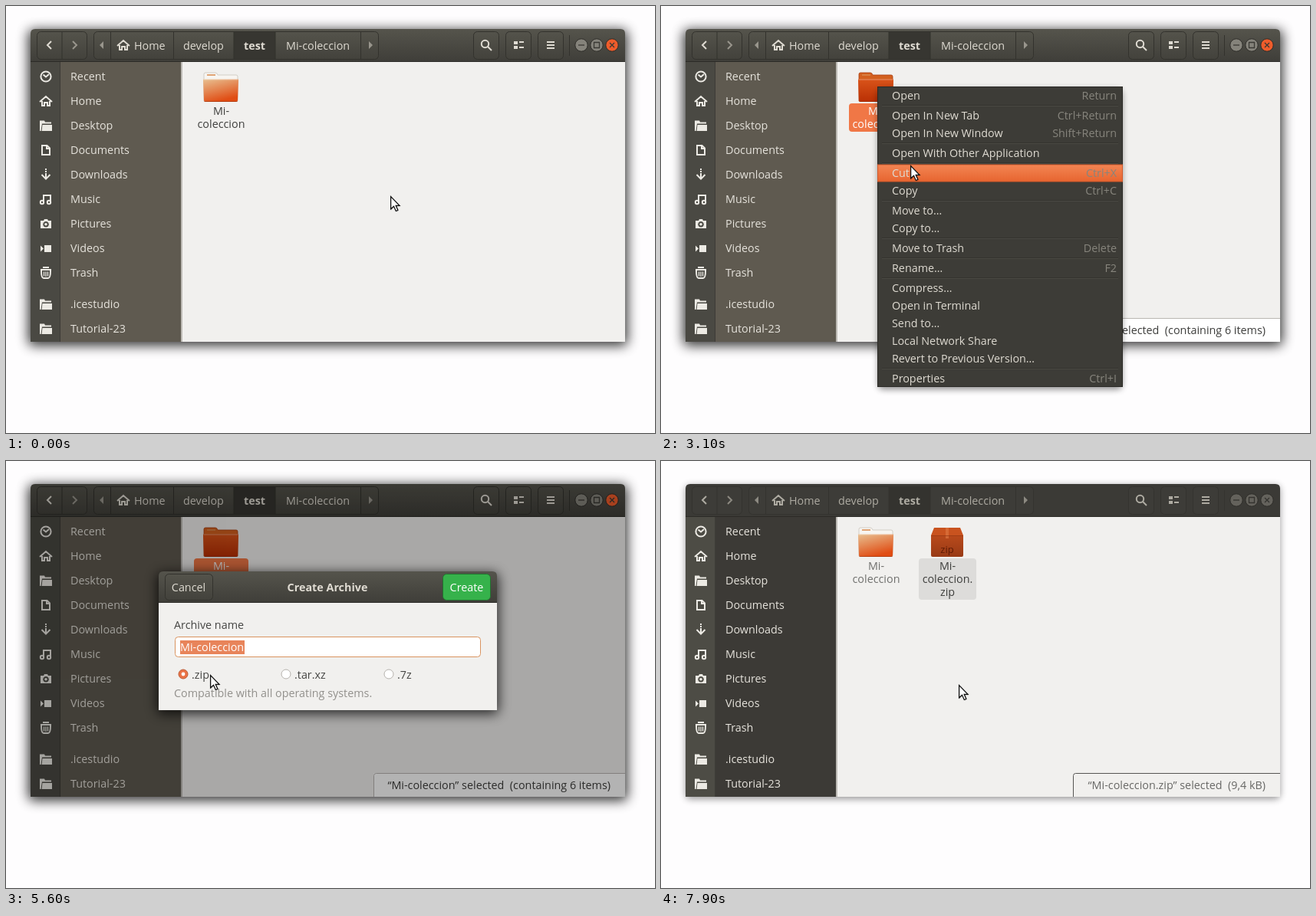
An HTML page for the animation above (8 s loop, 846 by 557 pixels).

```html
<!DOCTYPE html>
<html lang="en">
<head>
<meta charset="utf-8">
<title>Create archive</title>
<style>
html, body { margin: 0; width: 100%; height: 100%; overflow: hidden; background: #fefdfe; }
svg { display: block; width: 846px; height: 557px; }
text { font: 14.35px "Open Sans", "Noto Sans", sans-serif; white-space: pre; }
.b { font-weight: 700; }
.mid { text-anchor: middle; }
.end { text-anchor: end; }
.ln { fill: none; stroke: currentColor; stroke-width: 2; }
.ic { fill: currentColor; }

.on {
  --head: url(#headOn); --btn: url(#btnOn); --edge: #33322d; --fg: #dfdbd2; --low: #99968d;
  --down: #373631; --side: #5f5a50; --strip: #4a4943; --label: #3f3f3d;
  --knob: #85837b; --close: #ee5c2b; --glyph: #3a3934;
  --bar: #fff; --barEdge: #b9b6b2; --barText: #3d3d3b;
}
.off {
  --head: #3b3a36; --btn: #3d3c38; --edge: #34332f; --fg: #aeaba2; --low: #8d8a82;
  --down: #34332f; --side: #3c3a36; --strip: #4d4c45; --label: #70706e;
  --knob: #64625c; --close: #64625c; --glyph: #34332f;
  --bar: #f1f0ee; --barEdge: #555452; --barText: #686866;
}
.head { fill: var(--head); }
.btn { fill: var(--btn); stroke: var(--edge); }
.side text { fill: #e6e3dc; }
.side { color: #eceae4; }
.tool { color: var(--fg); }
.tool text { fill: var(--fg); }
.label { fill: var(--label); }
.bar rect { fill: var(--bar); }
.bar path { fill: none; stroke: var(--barEdge); }
.bar text { fill: var(--barText); }
.menu text { fill: #dfdbd2; }
.menu .key { fill: #87857d; }
.dlg .body text { fill: #454543; }

/* 1.25% is 100 ms */
.a { animation: 8s step-end -10ms infinite; }
.winOn { animation-name: winOn; }
.winOff { animation-name: winOff; }
.plain { animation-name: plain; }
.hover { animation-name: hover; }
.sel { animation-name: sel; }
.bar1 { animation-name: bar1; }
.bar2 { animation-name: bar2; }
.menu { animation-name: menu; }
.hl { animation-name: hl; }
.dim { animation-name: dim; }
.dlg { animation-name: dlg; transform-origin: 420px 235px; }
.go { animation-name: go; }
.dot { animation-name: dot; }
.cursor { animation-name: cursor; }

@keyframes winOn { 0% { opacity: 1 } 86.25%, 100% { opacity: 0 } }
@keyframes winOff { 0% { opacity: 0 } 86.25%, 100% { opacity: 1 } }
@keyframes plain { 0% { opacity: 1 } 17.5%, 100% { opacity: 0 } }
@keyframes hover { 0% { opacity: 0 } 17.5% { opacity: 1 } 31.25%, 100% { opacity: 0 } }
@keyframes sel { 0% { opacity: 0 } 31.25%, 100% { opacity: 1 } }
@keyframes bar1 { 0% { opacity: 1 } 93.75%, 100% { opacity: 0 } }
@keyframes bar2 { 0% { opacity: 0 } 93.75%, 100% { opacity: 1 } }
@keyframes menu { 0% { opacity: 0 } 31.25% { opacity: 1 } 55%, 100% { opacity: 0 } }
@keyframes hl {
  0% { opacity: 0; transform: translateY(117px) }
  35% { opacity: 1; transform: translateY(117px) }
  36.25% { opacity: 1; transform: translateY(143px) }
  37.5% { opacity: 1; transform: translateY(166px) }
  38.75% { opacity: 1; transform: translateY(218px) }
  40% { opacity: 1; transform: translateY(241px) }
  41.25% { opacity: 1; transform: translateY(267px) }
  42.5% { opacity: 1; transform: translateY(316px) }
  43.75% { opacity: 1; transform: translateY(342px) }
  45% { opacity: 1; transform: translateY(391px) }
  46.25% { opacity: 1; transform: translateY(414px) }
  47.5% { opacity: 1; transform: translateY(437px) }
  48.75% { opacity: 1; transform: translateY(368px) }
  50% { opacity: 1; transform: translateY(316px) }
  51.25%, 100% { opacity: 1; transform: translateY(368px) }
}
@keyframes dim {
  0% { opacity: 0 }
  56.25% { opacity: 0; animation-timing-function: steps(5) }
  62.5% { opacity: .3 }
  86.25% { opacity: .3; animation-timing-function: steps(2) }
  88.75% { opacity: .168; animation-timing-function: steps(2) }
  91.25%, 100% { opacity: 0 }
}
@keyframes dlg {
  0% { opacity: 0; transform: scaleY(.5) }
  57.5% { opacity: .75; transform: scaleY(.75) }
  58.75% { opacity: 1; transform: none }
  85% { opacity: .4; transform: scaleY(.4) }
  86.25%, 100% { opacity: 0; transform: scaleY(.4) }
}
@keyframes go { 0% { fill: #36b24b } 81.25% { fill: #45c45a } 83.75%, 100% { fill: #2b9440 } }
@keyframes dot { 0% { fill: #ea7347 } 77.5%, 100% { fill: #e2602f } }
@keyframes cursor {
  0% { transform: translate(501px, 248px) }
  6.25% { transform: translate(501px, 248px); animation-timing-function: steps(3) }
  10% { transform: translate(445px, 213px); animation-timing-function: steps(3) }
  13.75% { transform: translate(350px, 147px); animation-timing-function: steps(3) }
  17.5% { transform: translate(289px, 105px) }
  18.75% { transform: translate(289px, 105px); animation-timing-function: steps(2) }
  21.25% { transform: translate(280px, 103px) }
  33.75% { transform: translate(280px, 103px); animation-timing-function: steps(3) }
  37.5% { transform: translate(308px, 165px) }
  38.75% { transform: translate(325px, 208px); animation-timing-function: steps(5) }
  45% { transform: translate(344px, 383px); animation-timing-function: steps(2) }
  47.5% { transform: translate(346px, 440px); animation-timing-function: steps(2) }
  50% { transform: translate(345px, 312px) }
  51.25% { transform: translate(345px, 361px) }
  53.75% { transform: translate(345px, 361px); animation-timing-function: steps(7) }
  62.5% { transform: translate(330px, 284px) }
  63.75% { transform: translate(330px, 284px); animation-timing-function: steps(5) }
  70% { transform: translate(266px, 279px); animation-timing-function: steps(2) }
  72.5% { transform: translate(268px, 285px) }
  78.75% { transform: translate(268px, 285px); animation-timing-function: steps(2) }
  81.25% { transform: translate(607px, 167px) }
  92.5% { transform: translate(607px, 167px); animation-timing-function: steps(5) }
  98.75%, 100% { transform: translate(388px, 292px) }
}
</style>
</head>
<body>
<svg id="stage" viewBox="0 0 846 557"></svg>
<script>
const grad = (id, from, to, x2 = 0) =>
  `<linearGradient id="${id}" x1="0" y1="0" x2="${x2}" y2="1">
    <stop stop-color="${from}"/><stop offset="1" stop-color="${to}"/></linearGradient>`;
const rect = (x, y, w, h, attrs = '') => `<rect x="${x}" y="${y}" width="${w}" height="${h}" ${attrs}/>`;
const text = (x, y, str, cls = '', attrs = '') => `<text x="${x}" y="${y}" class="${cls}" ${attrs}>${str}</text>`;
const at = (x, y, body) => `<g transform="translate(${x} ${y})">${body}</g>`;
const line = d => `<path class="ln" d="${d}"/>`;
const solid = d => `<path class="ic" fill-rule="evenodd" d="${d}"/>`;
const shadow = (x, y, w, h, blur, alpha) =>
  rect(x, y, w, h, `rx="6" opacity="${alpha}" style="filter:blur(${blur}px)"`);
const topRound = (x, y, w, h) =>
  `M${x} ${y + h}V${y + 6}q0-6 6-6H${x + w - 6}q6 0 6 6V${y + h}Z`;

const icon = {
  home: line('M-8 1L0-6L8 1M-5 0V6H-2V2H2V6H5V0'),
  clock: `<circle class="ln" r="6.6"/>` + line('M-3.5-2.5L0 .5L4-3'),
  folder: solid('M-8 7V-6.5H-2L-1-4.5H7V-2.5H-5L-6.5 7ZM-4.5-1H8V7H-5.5Z'),
  doc: line('M-5-6H1.5L5-2.5V6H-5ZM1-6V-2H5'),
  down: line('M0-8V-6M0-5V-3M0-2V5M-5.5 0L0 5.5L5.5 0'),
  music: line('M-3 4V-5H6V3') + '<circle class="ln" cx="-5" cy="4" r="2.2"/><circle class="ln" cx="4" cy="4" r="2.2"/>',
  camera: solid('M-7-4H-3L-2-6H2L3-4H7V6H-7ZM0-3a3.8 3.8 0 1 0 .1 0Z') + '<circle class="ic" cy=".8" r="1.8"/>',
  video: solid('M-2-4H7V5H-2ZM-7-3.5L-3 .5L-7 4.5Z'),
  trash: line('M-7-4H7M-4-7H4M-6-3Q-6 7-3 7H3Q6 7 6-3') +
    '<path d="M-2.5-1.5V4.5M0-1.5V5M2.5-1.5V4.5" stroke="currentColor" stroke-width="1.3"/>',
};

const places = [['Recent', 'clock'], ['Home', 'home'], ['Desktop', 'folder'], ['Documents', 'doc'],
  ['Downloads', 'down'], ['Music', 'music'], ['Pictures', 'camera'], ['Videos', 'video'],
  ['Trash', 'trash'], ['.icestudio', 'folder'], ['Tutorial-23', 'folder']];

const sidebar = () => '<g class="side">' +
  rect(32, 73, 197, 365, 'style="fill:var(--side)"') +
  rect(32, 73, 39, 365, 'style="fill:var(--strip)"') +
  rect(70, 73, 1, 365, 'fill="#000" opacity=".18"') +
  places.map(([name, ic], i) => {
    const y = 92 + i * 32 + (i > 8 ? 9 : 0);
    return at(52, y, icon[ic]) + text(84, y + 5, name);
  }).join('') + '</g>' + rect(228, 73, 2, 365, 'fill="#bdbab5"');

const knob = (x, color, glyph) =>
  `<circle cx="${x}" cy="51" r="8.2" style="fill:var(${color});stroke:#2e2d29"/>` +
  at(x, 51, `<path d="${glyph}" style="fill:none;stroke:var(--glyph);stroke-width:1.3"/>`);

const header = () => '<g class="tool">' +
  `<path class="head" d="${topRound(32, 30, 775, 43)}"/>` +
  rect(32, 72, 775, 1, 'fill="#2c2b27"') +
  [[40, 66], [114, 372], [609, 34], [651, 34], [693, 34]].map(([x, w]) =>
    rect(x + .5, 33.5, w - 1, 36, 'class="btn" rx="5"')).join('') +
  rect(297, 34, 54, 35, 'style="fill:var(--down)"') +
  '<path d="M73 34V69M136.5 34V69M218.5 34V69M297 34V69M351 34V69M462.5 34V69M734.5 38V65" style="stroke:var(--edge)"/>' +
  line('M59 46L54 51L59 56') +
  '<g style="color:var(--low)">' + line('M87 46L92 51L87 56') + solid('M127 46V56L122 51ZM473 46V56L478 51Z') + '</g>' +
  at(153, 51, icon.home) +
  text(167, 57, 'Home') + text(231, 57, 'develop') + text(324, 57, 'test', 'b mid') + text(365, 57, 'Mi-coleccion') +
  '<circle class="ln" cx="624.5" cy="49.5" r="4.7"/>' + line('M628 53L633 58') +
  solid('M662 46h5v4h-5zM662 52h5v4h-5zM669 46h6v2h-6zM669 53h6v2h-6zM705 46h10v2h-10zM705 50h10v2h-10zM705 54h10v2h-10z') +
  knob(750, '--knob', 'M-4 0H4') + knob(770, '--knob', 'M-3.5-3.5H3.5V3.5H-3.5Z') +
  knob(790, '--close', 'M-3-3L3 3M3-3L-3 3') + '</g>';

const folder = (paper, edge, front) =>
  `<path d="M258 124V89q0-2 2-2H273q2 0 3 3H300q2 0 2 2V124Z" fill="${paper}" stroke="${edge}" stroke-width=".8"/>
  <path d="M262 90H273" stroke="#d98a4c" stroke-width="1.5"/>
  <path d="M257 95.5H303V98L302 123q0 2-2 2H260q-2 0-2-2L257 98Z" fill="url(#${front})"/>
  <path d="M257.5 96H302.5" stroke="#fff" opacity=".35"/>
  <path d="M258.5 124.5H301.5" stroke="#8a2a08" opacity=".5"/>`;

const label = (x, rows, cls, attrs = '') => rows.map((s, i) => text(x, 142 + i * 17, s, cls + ' mid', attrs)).join('');
const folderLabel = (cls, attrs) => label(280.5, ['Mi-', 'coleccion'], cls, attrs);

const zipFile = rect(336, 127, 75, 54, 'rx="4" fill="#dddcda"') +
  `<path d="M356 87H390L394 97H352Z" fill="#c9531f"/>
  <path d="M352 97H394V123q0 2-2 2H354q-2 0-2-2Z" fill="url(#box)"/>
  <path d="M371 87H375V101H371Z" fill="#e07a45" opacity=".6"/>
  <path d="M352 97.5H394" stroke="#8f3412" opacity=".6"/>` +
  text(373, 120, 'zip', 'mid', 'style="font-size:13px;fill:#5e1a04"') +
  label(373.5, ['Mi-', 'coleccion.', 'zip'], '', 'fill="#3f3f3d"');

const status = (x, str, cls) => `<g class="bar ${cls}">` +
  rect(x, 407, 807 - x, 31) + `<path d="M${x + .5} 438V410.500q0-3 3-3H807"/>` +
  text(788, 428, str, 'end') + '</g>';
const folderStatus = '“Mi-coleccion” selected  (containing 6 items)';

const pane = body => header() + rect(229, 73, 578, 365, 'fill="#f1f0ee"') + sidebar() + body;

const focused = '<g class="a winOn on">' + shadow(29, 31, 781, 412, 8, .8) + pane(
  `<g class="a plain">${folder('#f7f5f1', '#c9c4bb', 'fill')}</g>` +
  `<g class="a hover">${folder('#fffdf8', '#e6ded2', 'fillHover')}</g>` +
  folderLabel('label') +
  '<g class="a sel">' + rect(245, 127, 71, 37, 'rx="4" fill="#f07746"') +
  folder('#d3601f', '#a93c0d', 'fillSel') + folderLabel('', 'fill="#fff"') +
  status(479, folderStatus, '') + '</g>') + '</g>';

const backdrop = '<g class="a winOff off">' + shadow(32, 32, 775, 409, 5, .4) + pane(
  folder('#f7f5f1', '#c9c4bb', 'fill') + folderLabel('label') + zipFile +
  status(479, folderStatus, 'a bar1') +
  status(537, '“Mi-coleccion.zip” selected  (9,4 kB)', 'a bar2')) + '</g>';

const items = [[117, 'Open', 'Return'], [143, 'Open In New Tab', 'Ctrl+Return'],
  [166, 'Open In New Window', 'Shift+Return'], [192, 'Open With Other Application'],
  [218, 'Cut', 'Ctrl+X'], [241, 'Copy', 'Ctrl+C'], [267, 'Move to…'], [290, 'Copy to…'],
  [316, 'Move to Trash', 'Delete'], [342, 'Rename…', 'F2'], [368, 'Compress…'],
  [391, 'Open in Terminal'], [414, 'Send to…'], [437, 'Local Network Share'],
  [460, 'Revert to Previous Version…'], [486, 'Properties', 'Ctrl+I']];

const menu = '<g class="a menu">' + shadow(283, 109, 318, 391, 4, .45) +
  rect(282.5, 105.5, 319, 391, 'fill="#3d3c37" stroke="#2b2a26"') +
  items.map(([y], i) => i && y - items[i - 1][0] > 23
    ? rect(288, y - 14, 308, 1, 'fill="#34332e"') + rect(288, y - 13, 308, 1, 'fill="#4a4943"') : '').join('') +
  '<g class="a hl">' + rect(282.5, -11, 319, 22, 'fill="url(#hot)" stroke="#d0582a"') + '</g>' +
  items.map(([y, name, key = '']) =>
    text(301, y + 5, name) + text(594, y + 5, key, 'key end')).join('') + '</g>';

const radio = (x, name, on) =>
  `<circle cx="${x}" cy="278" r="6" ${on ? 'class="a dot" stroke="#bd5a34"' : 'fill="#fff" stroke="#b5b2ad"'}/>` +
  (on ? `<circle cx="${x}" cy="278" r="2.4" fill="#fff"/>` : '') + text(x + 11, 284, name);

const dialog = '<g class="a dlg on">' + shadow(197, 146, 445, 184, 8, .75) +
  `<path class="head" d="${topRound(199, 144, 441, 41)}"/>` + rect(199, 184, 441, 1, 'fill="#2c2b27"') +
  rect(207.5, 147.5, 62, 34, 'class="btn" rx="5"') +
  rect(569.5, 147.5, 62, 34, 'class="a go" rx="5" stroke="#23702f"') +
  '<g class="tool">' + text(238, 170, 'Cancel', 'mid') + text(419, 170, 'Create Archive', 'b mid') + '</g>' +
  text(600.5, 170, 'Create', 'mid', 'fill="#fff"') +
  '<g class="body">' + rect(199, 185, 441, 140, 'fill="#f1f0ee"') + text(219, 219, 'Archive name') +
  rect(220.5, 229.5, 398, 26, 'rx="4" fill="#fff" stroke="#d9935f"') +
  rect(227, 234, 84, 18, 'fill="#e8845a"') + text(227, 248, 'Mi-coleccion', '', 'style="fill:#fff"') +
  radio(231, '.zip', true) + radio(365, '.tar.xz') + radio(499, '.7z') +
  text(219, 308, 'Compatible with all operating systems.', '', 'style="fill:#92908c"') + '</g></g>';

const defs = '<defs>' + grad('headOn', '#55544c', '#3f3e39') + grad('btnOn', '#54534b', '#43423c') +
  grad('fill', '#e8c091', '#e04d14', .4) + grad('fillHover', '#f3d3ae', '#ee6428', .4) +
  grad('fillSel', '#d9541a', '#b92f04') + grad('box', '#b94a1c', '#983a15') +
  grad('hot', '#f28553', '#e76530') + '</defs>';

const pointer = '<g class="a cursor">' +
  '<path d="M1 2V18.500L5 14.500L8 20.500L10.500 19.500L8 13.500H13Z" opacity=".25"/>' +
  '<path d="M.6.6V16.800L4.500 13.300L7.300 19.500L9.900 18.300L7.200 12.300H12Z" fill="#fff" stroke="#111" stroke-width="1.3"/></g>';

document.getElementById('stage').innerHTML = defs + focused + backdrop +
  `<path class="a dim" d="${topRound(32, 30, 775, 408)}"/>` + menu + dialog + pointer;
</script>
</body>
</html>
```
